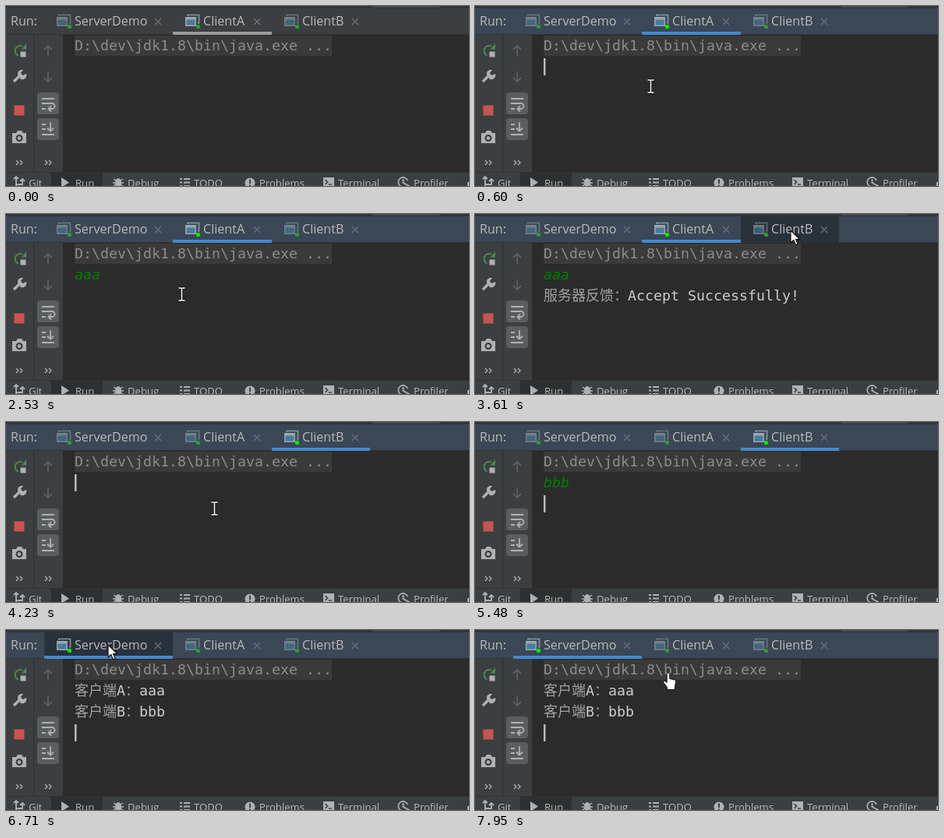
An HTML page for the animation above (8000 ms loop, 594 by 231 pixels).

```html
<!DOCTYPE html>
<html lang="zh-CN">
<head>
<meta charset="utf-8">
<title>Run console</title>
<style>
html, body { margin: 0; width: 594px; height: 231px; overflow: hidden; background: #2b2b2b; }
svg { display: block; }
text { white-space: pre; }
.ui { font: 16.1px "Open Sans", "Noto Sans", sans-serif; fill: #bbbbbb; }
.bar { font: 13.1px "Open Sans", "Noto Sans", sans-serif; fill: #bbbbbb; }
.mono { font: 18.27px "DejaVu Sans Mono", "Noto Sans CJK SC", "Noto Sans CJK", monospace; fill: #cccccc; }
.mono .han { font-size: 18px; fill: #a2a2a2; }
.mono.typed { font-style: italic; fill: #007f00; }
.ime { font: 17px "Noto Sans CJK SC", "Noto Sans CJK", "Open Sans", sans-serif; fill: #0a74d6; }
.ime .num { font-size: 14px; }
.ime .first { fill: #f4581c; }
.line { fill: none; stroke: #afb1b3; stroke-width: 1.8; }
.dim { stroke: #5d6063; }
.fill { fill: #afb1b3; }
</style>
</head>
<body>
<svg id="stage" width="594" height="231" viewBox="0 0 594 231">
  <rect width="594" height="231" fill="#2b2b2b"/>
  <rect width="594" height="3" fill="#323435"/>
  <rect x="470" width="86" height="2" fill="#45484a"/>
  <rect id="header" y="3" width="594" height="33"/>
  <rect id="hover" y="3" height="33" fill="#29323b"/>
  <rect y="36" width="594" height="1" fill="#323232"/>
  <text class="ui" x="6" y="25">Run:</text>
  <g id="tabs"></g>
  <rect id="underline" y="33" height="4"/>

  <rect y="37" width="73" height="176" fill="#3c3f41"/>
  <rect x="35" y="37" width="1.5" height="176" fill="#323436"/>
  <!-- run controls -->
  <path class="line" style="stroke:#478a52;stroke-width:2" d="M21 51.500A6.500 6.500 0 1 0 15.500 63.500"/>
  <path fill="#478a52" d="M19.500 55.500h6.500v-7z"/>
  <rect class="fill" x="18.500" y="58.500" width="7" height="7"/>
  <path class="line" style="stroke-width:3.6" d="M10 97L17 90"/>
  <path class="fill" d="M15 88a5.5 5.5 0 0 1 7-6l-3 4 2 3 5-2a5.5 5.5 0 0 1-7 7z"/>
  <rect x="10.500" y="127.500" width="13" height="13" fill="#c75450"/>
  <path class="fill" fill-rule="evenodd" d="M8 163h5l2-3h5l2 3h4v13H8zM17 165a4.500 4.500 0 1 0 .1 0z"/>
  <circle class="fill" cx="17" cy="169.500" r="2.300"/>
  <!-- console controls -->
  <path class="line dim" d="M54 64V51M49 56l5-5 5 5M54 84v13M49 92l5 5 5-5"/>
  <g fill="#5a5e61"><rect x="40" y="111" width="28" height="28" rx="4"/><rect x="40" y="144" width="28" height="28" rx="4"/></g>
  <path class="line" d="M46 119h16M46 125h13a3.500 3.500 0 0 1 0 7h-4M46 132h5M58 128.500l-3.500 3.500 3.500 3.500"/>
  <path class="line" d="M46 165h16M46 152h5M46 158h5M57 149v11M53 156.500l4 4 4-4"/>
  <path class="line" style="stroke-width:1.300" d="M13 198l3 3-3 3M18 198l3 3-3 3M50 198l3 3-3 3M55 198l3 3-3 3"/>

  <rect y="213" width="594" height="18" fill="#3c3f41"/>
  <rect y="213" width="594" height="1" fill="#323232"/>
  <rect x="58" y="214" width="66" height="17" fill="#2d2f30"/>
  <path class="line" d="M13 220v11M13 229h8v-5M10 222l3-3 3 3M18 225l3-3 3 3"/>
  <path class="fill" d="M71 220l10 6.500-10 6.500z"/>
  <ellipse class="fill" cx="144" cy="227" rx="4" ry="6"/>
  <path class="line" style="stroke-width:1.400" d="M138 222l12 9M150 222l-12 9M137 227h14"/>
  <path class="line" d="M223 222h3M228 222h8M223 226.500h3M228 226.500h8M223 231h3M228 231h8"/>
  <circle class="fill" cx="313" cy="227" r="6.500"/>
  <path stroke="#3c3f41" stroke-width="2" d="M313 222.500v5.500M313 229.500v2"/>
  <rect class="fill" x="407" y="220" width="14" height="12"/>
  <path fill="none" stroke="#3c3f41" stroke-width="1.600" d="M409.500 223l3 3-3 3M414 229h4"/>
  <path class="line" d="M515 224a6 6 0 1 0-6 8M509.500 222v5l8 4"/>
  <rect class="fill" x="592" y="226" width="2" height="5"/>
  <g id="bar"></g>

  <rect x="88" y="38" width="330" height="26" fill="#3a3a3a"/>
  <text class="mono" x="88" y="57" style="fill:#8c8c8c">D:\dev\jdk1.8\bin\java.exe ...</text>
  <text class="mono" id="line1" x="88" y="84"></text>
  <text class="mono" id="line2" x="88" y="111"></text>
  <rect id="caret" width="2.500" height="22" fill="#bbbbbb"/>

  <defs><linearGradient id="blush"><stop offset="0" stop-color="#fff"/><stop offset="1" stop-color="#f6e6f3"/></linearGradient></defs>
  <g id="popups"></g>
  <g id="mouse">
    <path id="arrow" fill="#fff" stroke="#111" stroke-width="1.200" d="M0 0v16l3.700-3.500 2.800 6.300 2.700-1.200-2.700-6h5z"/>
    <path id="hand" fill="#fff" stroke="#111" d="M-1.800 1.500Q0-1 1.800 1.500V8l6.500 1.500q1.500.5 1.300 3L8.500 18v4H-1.500v-3L-6 13q-.8-2.500 1-2.500l3.200 2.500z"/>
    <g id="ibeam" fill="none"><path stroke="#111" stroke-width="3.400" d="M-4-8h3l1 1 1-1h3M0-7V7M-4 8h3l1-1 1 1h3"/><path stroke="#fff" stroke-width="1.500" d="M-4-8h3l1 1 1-1h3M0-7V7M-4 8h3l1-1 1 1h3"/></g>
  </g>
</svg>
<script>
const LOOP = 8000, CHAR = 11;
const $ = id => document.getElementById(id);
const set = (el, attrs) => { for (const k in attrs) el.setAttribute(k, attrs[k]); };
const show = (el, on) => { el.style.display = on ? '' : 'none'; };

function add(parent, tag, attrs, text) {
  const el = document.createElementNS('http://www.w3.org/2000/svg', tag);
  set(el, attrs);
  if (text) el.textContent = text;
  return parent.appendChild(el);
}

const tabs = [
  { name: 'ServerDemo', x: 49, w: 165 },
  { name: 'ClientA', x: 214, w: 127 },
  { name: 'ClientB', x: 341, w: 126 }
];
for (const tab of tabs) {
  const g = add($('tabs'), 'g', { transform: `translate(${tab.x} 0)` });
  const icon = tab.icon = add(g, 'g', {});
  add(icon, 'path', { d: 'M19 13V11.500H33.500V22H32', fill: 'none', stroke: '#8d9699', 'stroke-width': 1.6 });
  add(icon, 'rect', { x: 16, y: 14, width: 14, height: 12, fill: '#9aa7b0' });
  add(icon, 'rect', { x: 17.5, y: 17.5, width: 11, height: 7, fill: '#42809c' });
  tab.dot = add(g, 'circle', { cx: 32.5, cy: 26.5, r: 2.7 });
  add(g, 'text', { class: 'ui', x: 39, y: 25 }, tab.name);
  const x = tab.w - 19;
  add(g, 'path', { d: `M${x - 4} 16l8 8m0-8l-8 8`, stroke: '#69727a', 'stroke-width': 1.2 });
}

const barItems = [['Git', 29], ['Run', 89], ['Debug', 156], ['TODO', 241], ['Problems', 325], ['Terminal', 426], ['Profiler', 523]];
for (const [label, x] of barItems) add($('bar'), 'text', { class: 'bar', x, y: 231.5 }, label);

// Input method popups: typed letters, candidates, and the time each shows
const face = 'w(ﾟДﾟ)w';
const popups = [
  { typed: 'a', words: ['啊', '阿', '吖', '呵', '嗄'], from: 1060, to: 1290 },
  { typed: 'aa', words: ['AA', '啊啊', '吖吖', face, '阿阿'], from: 1290, to: 1440 },
  { typed: 'aaa', words: ['啊啊啊', '啊啊啊啊', '啊啊啊啊啊', face, '阿阿'], from: 1440, to: 1820 }
];
const wordWidth = w => w === face ? 69 : w === 'AA' ? 24 : w.length * 17;
for (const p of popups) {
  const g = p.el = add($('popups'), 'g', { class: 'ime' });
  const box = add(g, 'rect', { x: 90, y: 104, height: 55, rx: 2, fill: '#fff' });
  const glow = add(g, 'rect', { y: 104, width: 90, height: 30, fill: 'url(#blush)' });
  add(g, 'text', { x: 101, y: 122 }, p.typed);
  add(g, 'rect', { x: 101.5 + p.typed.length * 9, y: 108, width: 1, height: 17, fill: '#333' });
  let x = 101;
  p.words.forEach((word, i) => {
    const tone = i ? '' : ' first';
    add(g, 'text', { class: 'num' + tone, x, y: 148 }, String(i + 1));
    add(g, 'text', { class: tone, x: x + 12, y: 149 }, word);
    x += wordWidth(word) + 27;
  });
  const end = x + 50;
  set(box, { width: end - 90 });
  set(glow, { x: end - 90 });
  add(g, 'circle', { cx: end - 16, cy: 117, r: 9, fill: '#e9603c' });
  const arrow = (d, stroke) => add(g, 'path', { d, stroke, fill: 'none', 'stroke-width': 1.5 });
  arrow(`M${end - 42} 142l-3 3 3 3`, '#c9d6e2');
  arrow(`M${end - 31} 141l4 4-4 4`, '#0a74d6');
  arrow(`M${end - 17} 143l4 4 4-4`, '#0a74d6');
}

// Console states: time, tab, lines, caret [column, row]
const reply = '服务器反馈：Accept Successfully!';
const log = ['客户端A：aaa', '客户端B：bbb'];
const states = [
  [0, 1, [], null],
  [520, 1, [], [0, 1]],
  [1060, 1, [], null],
  [1590, 1, [], [0, 1]],
  [1820, 1, ['aaa'], null],
  [1900, 1, ['aaa'], [3, 1]],
  [2530, 1, ['aaa'], null],
  [2600, 1, ['aaa'], [0, 2]],
  [2770, 1, ['aaa', reply], [0, 3]],
  [3306, 1, ['aaa', reply], null],
  [3618, 2, [], [0, 1]],
  [4760, 2, ['b'], [1, 1]],
  [4930, 2, ['bb'], [2, 1]],
  [5080, 2, ['bbb'], [3, 1]],
  [5480, 2, ['bbb'], [0, 2]],
  [5630, 2, ['bbb', reply], [0, 3]],
  [6550, 0, log, [0, 3]],
  [7180, 0, log, null],
  [7720, 0, log, [0, 3]]
];

// Pointer moves: sampled in equal steps along evenly timed points
const moves = [
  { from: 120, to: 600, steps: 7, path: [[372, 206], [290, 150], [232, 108], [225.5, 103]] },
  { from: 3150, to: 3930, steps: 11, path: [[238, 90], [300, 52], [405, 21], [405, 21], [375, 44], [292, 95]] },
  { from: 4010, to: 4230, steps: 4, path: [[280, 106], [262, 114], [266, 112], [267.5, 111]] },
  { from: 5950, to: 6710, steps: 11, path: [[250, 104], [205, 72], [163, 40], [140, 26], [131, 19], [131, 19]] },
  { from: 6790, to: 7260, steps: 7, path: [[140, 26], [165, 40], [192, 60], [196, 62]] },
  { from: 7490, to: 7950, steps: 7, path: [[204, 64], [230, 60], [248, 54.5], [248, 54.5]] }
];

function pointer(t) {
  if (t < 120 || (t >= 5080 && t < 5950)) return null;
  const { from, to, steps, path } = moves.filter(m => m.from <= t).pop();
  const gap = (to - from) / (steps - 1);
  const k = Math.min(steps - 1, Math.floor((t - from) / gap + 0.1));
  const u = k / (steps - 1) * (path.length - 1);
  const i = Math.min(path.length - 2, Math.floor(u));
  const mix = axis => path[i][axis] + (path[i + 1][axis] - path[i][axis]) * (u - i);
  return [mix(0), mix(1)];
}

function pointerKind(x, y) {
  if (y < 38 || y > 213 || x < 73) return 'arrow';
  return y < 64 && x > 88 && x < 418 ? 'hand' : 'ibeam';
}

// Chinese runs are set smaller and dimmer than the Latin ones
function write(el, text) {
  if (el.textContent === text) return;
  el.textContent = '';
  for (const run of text.match(/[\x00-\x7f]+|[^\x00-\x7f]+/g) || [])
    add(el, 'tspan', { class: run < '\x7f' ? '' : 'han' }, run);
  el.classList.toggle('typed', /^[ab]+$/.test(text));
}

function render(t) {
  const [, active, lines, caret] = states.filter(s => s[0] <= t).pop();
  const focused = t >= 520;
  set($('header'), { fill: focused ? '#3b4754' : '#3c3f41' });
  set($('underline'), { x: tabs[active].x, width: tabs[active].w, fill: focused ? '#4a88c7' : '#9a9da0' });
  tabs.forEach((tab, i) => {
    set(tab.icon, { opacity: i === active ? 1 : 0.6 });
    set(tab.dot, { fill: focused && i === active ? '#0be60b' : '#2f9a35' });
  });

  for (const row of [1, 2]) write($('line' + row), lines[row - 1] || '');
  show($('caret'), caret);
  if (caret) set($('caret'), { x: 88 + caret[0] * CHAR, y: 40 + caret[1] * 27 });
  for (const p of popups) show(p.el, t >= p.from && t < p.to);

  const pos = pointer(t);
  show($('mouse'), pos);
  let hovered;
  if (pos) {
    const [x, y] = pos, kind = pointerKind(x, y);
    set($('mouse'), { transform: `translate(${x} ${y})` });
    for (const id of ['arrow', 'hand', 'ibeam']) show($(id), id === kind);
    hovered = y < 37 && tabs.find(tab => x >= tab.x && x < tab.x + tab.w);
  }
  show($('hover'), hovered);
  if (hovered) set($('hover'), { x: hovered.x, width: hovered.w });
}

const start = performance.now();
function tick() {
  render((performance.now() - start) % LOOP);
  requestAnimationFrame(tick);
}
tick();
</script>
</body>
</html>
```
